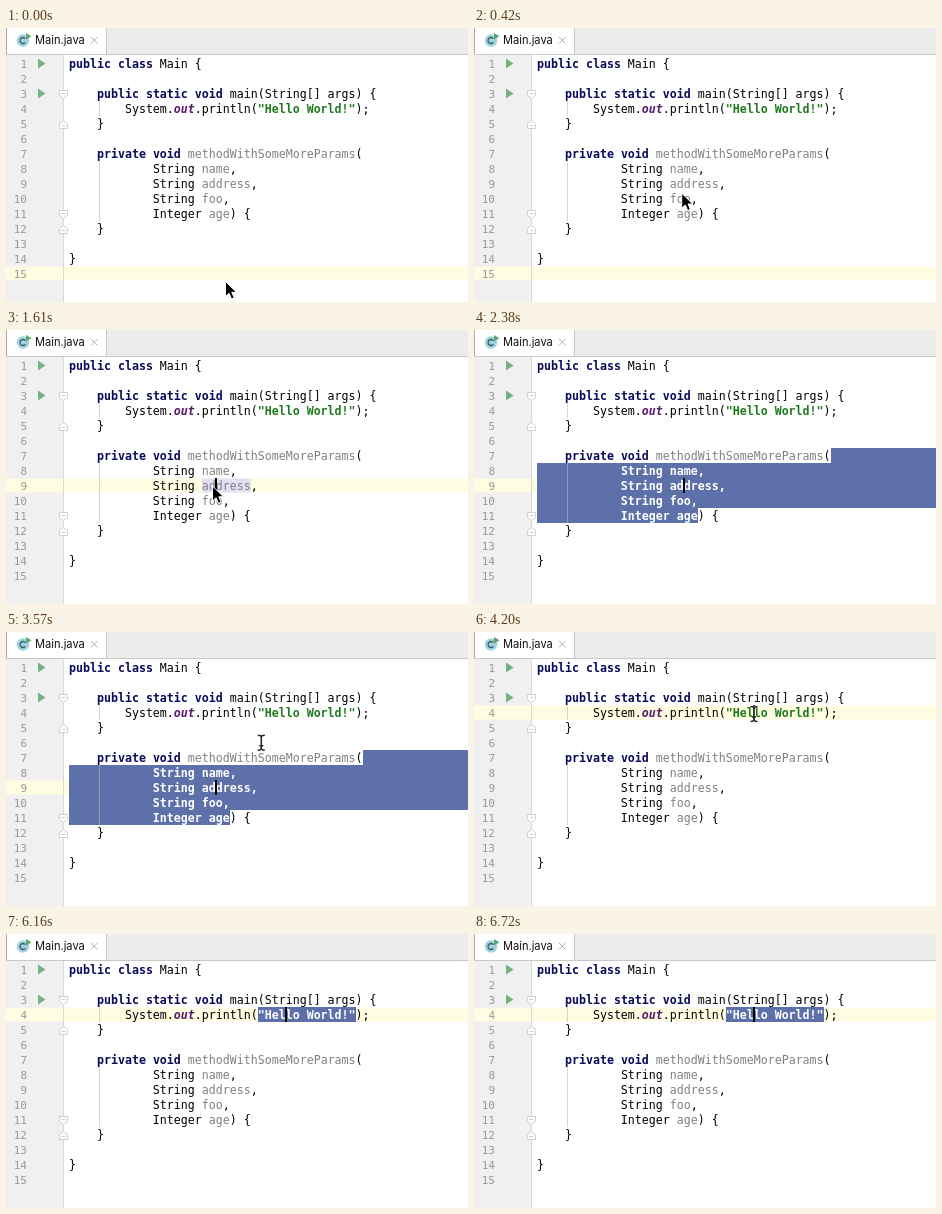
An HTML page for the animation above (7.07 s loop, 462 by 274 pixels).

```html
<!DOCTYPE html>
<html lang="en">
<head>
<meta charset="utf-8">
<style>
html, body { margin: 0; width: 100%; height: 100%; overflow: hidden; background: #fff; }
#stage { position: relative; width: 462px; height: 274px; overflow: hidden; background: #fff; }
#stage > * { position: absolute; }
svg { left: 0; top: 0; }
pre { margin: 0; top: 29px; font: 11.627px/15px "DejaVu Sans Mono", monospace; color: #000; }
#numbers { left: 0; width: 21px; text-align: right; color: #999; font-size: 11px; }
#code { left: 63px; }
#code b { color: #0a0a5c; }
#code u { color: #808080; text-decoration: none; }
#code em { color: #5a1a70; font-weight: bold; }
#code q { color: #1f7a1f; font-weight: bold; quotes: none; }
.params .p, .params .p u, .string #code q { color: #fff !important; font-weight: bold; }
#tab { left: 29px; top: 4px; font: 11.1px/17px Inter, sans-serif; color: #111; }
.sel { fill: #5d70a9; visibility: hidden; }
.params #params, .string #string { visibility: visible; }
</style>
</head>
<body>
<div id="stage">
  <svg width="462" height="274">
    <rect width="462" height="27" fill="#ececec"/>
    <rect width="100" height="26" fill="#fff"/>
    <path d="M100.5 0V26M0 26.5H462" stroke="#c8c8c8"/>
    <path d="M.5 0V26" stroke="#aaa"/>
    <circle cx="17" cy="12.5" r="6.2" fill="#9fd3e0"/>
    <path d="M19.4 10.6A3 3 0 1 0 19.4 14.4" fill="none" stroke="#3f5866" stroke-width="1.3"/>
    <path d="M20 5l5.5 3.2-5.5 3.2z" fill="#59a869"/>
    <path d="M85 9l6.5 6.5m0-6.5L85 15.5" stroke="#b0b0b0"/>
    <rect y="27" width="57" height="247" fill="#f0f0f0"/>
    <rect id="row" width="462" height="14" fill="#fefce1"/>
    <path d="M57.5 27V274" stroke="#dadada"/>
    <path d="M32 30.5l7.5 5-7.5 5zm0 30l7.5 5-7.5 5z" fill="#76b183"/>
    <g id="folds" fill="#fff" stroke="#d0d0d0"></g>
    <rect id="usage" x="196" y="148.5" width="49" height="14" fill="#e2e0f4"/>
    <path id="params" class="sel" d="M357 118H462V178H224V193H63V133H357z"/>
    <path id="string" class="sel" d="M252 73H350V88H252z"/>
    <path d="M93.5 73V88M93.5 133V193" stroke="#bbb" stroke-opacity=".6"/>
  </svg>
  <div id="tab">Main.java</div>
  <pre id="numbers"></pre>
  <pre id="code"><b>public class</b> Main {

    <b>public static void</b> main(String[] args) {
        System.<em>out</em>.println(<q>"Hello World!"</q>);
    }

    <b>private void</b> <u>methodWithSomeMoreParams</u>(
            <span class="p">String <u>name</u>,
            String <u>address</u>,
            String <u>foo</u>,
            Integer <u>age</u></span>) {
    }

}</pre>
  <svg width="462" height="274">
    <defs>
      <path id="beamShape" fill="none" d="M-3.5-7.5Q0-7.5 0-5.5Q0-7.5 3.5-7.5M0-6V6M-3.5 7.5Q0 7.5 0 5.5Q0 7.5 3.5 7.5M-2 3H2"/>
    </defs>
    <rect id="caret" width="2" height="15"/>
    <path id="arrow" d="M0 0V15L3.6 11.8 6 17.4 8.7 16.2 6.3 10.8H11z" stroke="#fff"/>
    <g id="beam">
      <use href="#beamShape" stroke="#fff" stroke-width="3" stroke-opacity=".6"/>
      <use href="#beamShape" stroke="#222" stroke-width="1.5"/>
    </g>
  </svg>
</div>
<script>
const LOOP = 7070, STEP = 70;
const CLICK_1 = 840, USAGE = 1190, SELECT_1 = 2380, MOVE_2 = 3430, CLICK_2 = 4200, SELECT_2 = 5460;
const $ = id => document.getElementById(id);
const rowTop = line => 13 + 15 * line;

$('numbers').textContent = Array.from({length: 15}, (_, i) => i + 1).join('\n');
$('folds').innerHTML = [[3, 1], [5, -1], [11, 1], [12, -1]].map(([line, dir]) =>
  `<path transform="translate(57.5 ${rowTop(line) + 8.5}) scale(1 ${dir})" d="M-4-4H4V1L0 4-4 1zM-2-1H2"/>`).join('');

const show = (id, on) => $(id).style.visibility = on ? 'visible' : 'hidden';
const easeOut = p => 1 - (1 - Math.min(1, Math.max(0, p))) ** 3;
function place(id, p, x0, y0, x1, y1) {
  const k = easeOut(p);
  $(id).setAttribute('transform', `translate(${x0 + (x1 - x0) * k} ${y0 + (y1 - y0) * k})`);
}

function draw(now) {
  const t = Math.floor(now % LOOP / STEP) * STEP;
  const line = t < CLICK_1 ? 15 : t < CLICK_2 ? 9 : 4;
  $('row').setAttribute('y', rowTop(line) + 0.5);
  $('caret').setAttribute('x', line === 9 ? 209 : 279);
  $('caret').setAttribute('y', rowTop(line));
  show('caret', line !== 15);
  show('usage', t >= USAGE && t < SELECT_1);
  $('stage').classList.toggle('params', t >= SELECT_1 && t < CLICK_2);
  $('stage').classList.toggle('string', t >= SELECT_2);
  show('arrow', t < SELECT_1);
  show('beam', t >= MOVE_2 && t < SELECT_2);
  place('arrow', t / 770, 219.5, 253.5, 206.5, 156);
  place('beam', (t - MOVE_2 + STEP) / 700, 208, 166, 280, 82);
  requestAnimationFrame(draw);
}
draw(performance.now());
</script>
</body>
</html>
```
